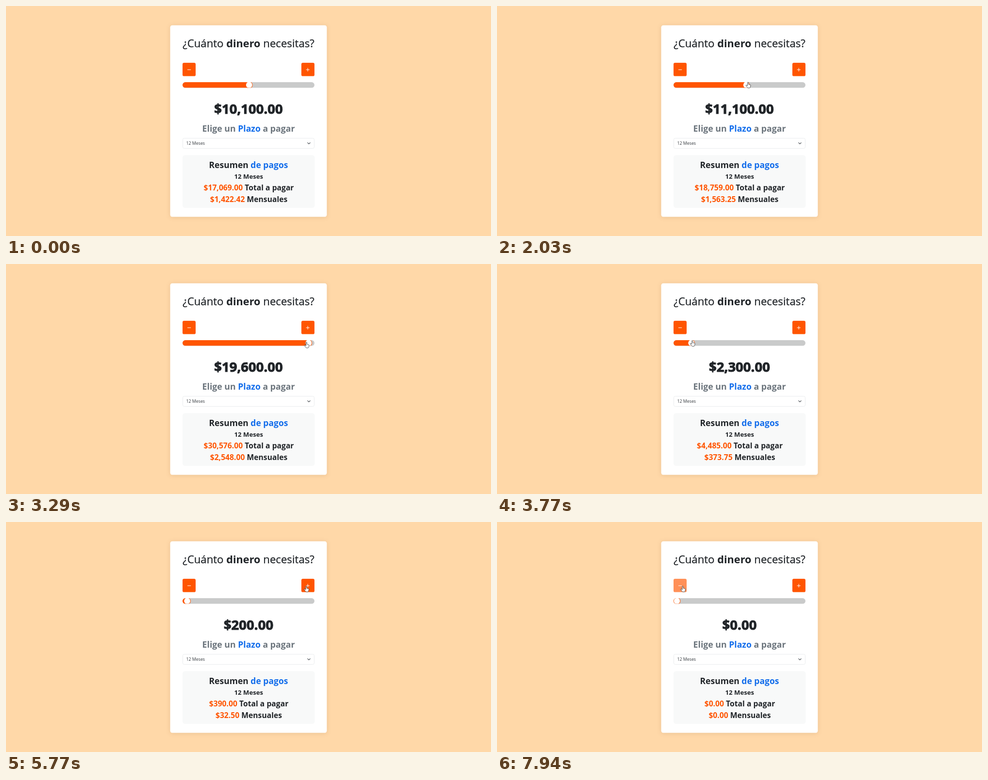
Write an HTML page that moves like this. It is 1000x474 px and loops after 8 s.

```html
<!DOCTYPE html>
<html lang="es">
<head>
<meta charset="utf-8">
<title>Simulador de pagos</title>
<style>
html, body { margin: 0; width: 100%; height: 100%; overflow: hidden; background: #ffd8a8; }
svg { display: block; width: 100vw; height: 100vh; }
text { font-family: "Open Sans", "Noto Sans", sans-serif; font-weight: 700; fill: #212529; text-anchor: middle; }
.card { fill: #fff; filter: drop-shadow(0 1px 5px rgba(90, 45, 0, .13)); }
.title { font-size: 22.2px; font-weight: 400; stroke: #212529; stroke-width: .3; }
.bold { font-size: 21.7px; font-weight: 700; stroke: none; }
.amount { font: 900 27.5px "Noto Sans", "Open Sans", sans-serif; stroke: #212529; stroke-width: 1.1; }
.term { font-size: 17.7px; fill: #6c757d; }
.choice { font-size: 8.8px; font-weight: 400; text-anchor: start; fill: #33383d; }
.head { font-size: 17.55px; }
.months { font-size: 13.2px; }
.sum { font-size: 15.7px; }
.blue { fill: #146eeb; }
.orange { fill: #ff5500; }
.icon { fill: none; stroke: #fff; }
</style>
</head>
<body>
<svg viewBox="0 0 1000 474">
  <clipPath id="clip"><rect x="364" y="157" width="272" height="11.6" rx="5.8"/></clipPath>
  <rect class="card" x="338.5" y="39.8" width="323" height="394.7" rx="4.5"/>
  <text class="title" x="500" y="85">¿Cuánto <tspan class="bold">dinero</tspan> necesitas?</text>

  <g id="minus">
    <rect class="orange" x="364" y="117" width="27" height="27.6" rx="3.2"/>
    <path class="icon" d="M374 131.3h7.2"/>
  </g>
  <g id="plus">
    <rect class="orange" x="609" y="117" width="27" height="27.6" rx="3.2"/>
    <path class="icon" d="M618.6 131.3h7.2M622.2 127.7v7.2"/>
  </g>

  <g clip-path="url(#clip)">
    <rect x="364" y="157" width="272" height="12" fill="#c9caca"/>
    <g id="thumb">
      <rect class="orange" x="-300" y="-6" width="300" height="12"/>
      <circle class="orange" r="7.3"/>
      <circle r="6.4" fill="#fff"/>
    </g>
  </g>

  <text class="amount" id="amount" x="500" y="222.3"></text>
  <text class="term" x="500" y="259">Elige un <tspan class="blue">Plazo</tspan> a pagar</text>
  <rect x="364.5" y="272.5" width="271" height="21" rx="3" fill="#fff" stroke="#eaecee"/>
  <text class="choice" x="371.5" y="286.2">12 Meses</text>
  <path d="M621.6 281.4l2.9 2.9 2.9-2.9" fill="none" stroke="#343a40" stroke-width="1.1"/>

  <rect x="364" y="307.5" width="272.5" height="108.5" rx="5" fill="#f8f9f9"/>
  <text class="head" x="500" y="334.3">Resumen <tspan class="blue">de pagos</tspan></text>
  <text class="months" x="500.3" y="356.4">12 Meses</text>
  <text class="sum" x="500.5" y="380"><tspan class="orange" id="total"></tspan> Total a pagar</text>
  <text class="sum" x="500.5" y="404"><tspan class="orange" id="monthly"></tspan> Mensuales</text>

  <g id="cursor" fill="#fff" stroke="#2b2b2b" stroke-width=".75" stroke-linejoin="round">
    <path id="arrow" d="M0 0v9l2.1-1.9 1.4 3 1.5-.7-1.4-2.9h2.8z"/>
    <path id="hand" d="M-1 1q0-1 1-1 1 0 1 1v3.5l3.5.8q1.2.3 1 1.6l-.7 3q-.3 1.8-1.5 2H.1q-1 0-1.5-1l-2.8-3.8q-.5-1 .6-1.2.8 0 2.6 1.6z"/>
  </g>
</svg>
<script>
const LOOP = 8000, MAX = 20000;
const $ = id => document.getElementById(id);

// Keys: time, then the values reached at that time
const pointer = [
  [310, 780, 250], [880, 522, 169.5], [1170, 504, 158], [1900, 504, 158],
  [2030, 517.5, 157], [2700, 636, 160], [3160, 636, 160], [3290, 619.5, 161],
  [3940, 359, 157], [4380, 359, 157], [4390, 356.5, 149.5], [4910, 619, 132],
  [6480, 619, 132], [6860, 383, 132]
];
const drag = [[1900, 10100], [2030, 11100], [2700, MAX], [3160, MAX], [3290, 19600], [3900, 0]];
const ups = [5570, 5770, 5970, 6150, 6480];
const downs = [7190, 7380, 7560, 7760, 7940];

function track(keys, t) {
  const next = keys.findIndex(k => k[0] > t);
  if (next < 0) return keys[keys.length - 1].slice(1);
  if (next === 0) return keys[0].slice(1);
  const [t0, ...from] = keys[next - 1], [t1, ...to] = keys[next];
  const p = (t - t0) / (t1 - t0), e = p * p * (3 - 2 * p);
  return from.map((v, i) => v + (to[i] - v) * e);
}

const passed = (times, t) => times.filter(x => x <= t).length;

function valueAt(t) {
  if (t > 4000) return 100 * (passed(ups, t) - passed(downs, t));
  return Math.round(track(drag, t)[0] / 100) * 100;
}

// Larger loans get a lower rate
const factor = v => 1.3 * (v <= 5000 ? 1.5 : v <= 10000 ? 1.4 : v <= 15000 ? 1.3 : 1.2);

const money = v => '$' + v.toLocaleString('en-US', { minimumFractionDigits: 2, maximumFractionDigits: 2 });

const show = (id, on) => $(id).setAttribute('visibility', on ? 'visible' : 'hidden');
const move = (id, x, y) => $(id).setAttribute('transform', `translate(${x} ${y})`);

function draw(t) {
  const value = valueAt(t), total = value * factor(value);
  $('amount').textContent = money(value);
  $('total').textContent = money(total);
  $('monthly').textContent = money(total / 12);
  $('minus').setAttribute('opacity', value > 0 ? 1 : .65);
  $('plus').setAttribute('opacity', value < MAX ? 1 : .65);
  move('thumb', 371 + 258 * value / MAX, 162.8);

  const [x, y] = track(pointer, t);
  const onButton = y > 117 && y < 145 && (x > 364 && x < 391 || x > 609 && x < 636);
  const hand = onButton || t >= 1170 && t < 4385;
  move('cursor', x, y);
  show('arrow', t >= 310 && !hand);
  show('hand', t >= 310 && hand);
}

const start = performance.now();
function frame() {
  draw((performance.now() - start) % LOOP);
  requestAnimationFrame(frame);
}
frame();
</script>
</body>
</html>
```
